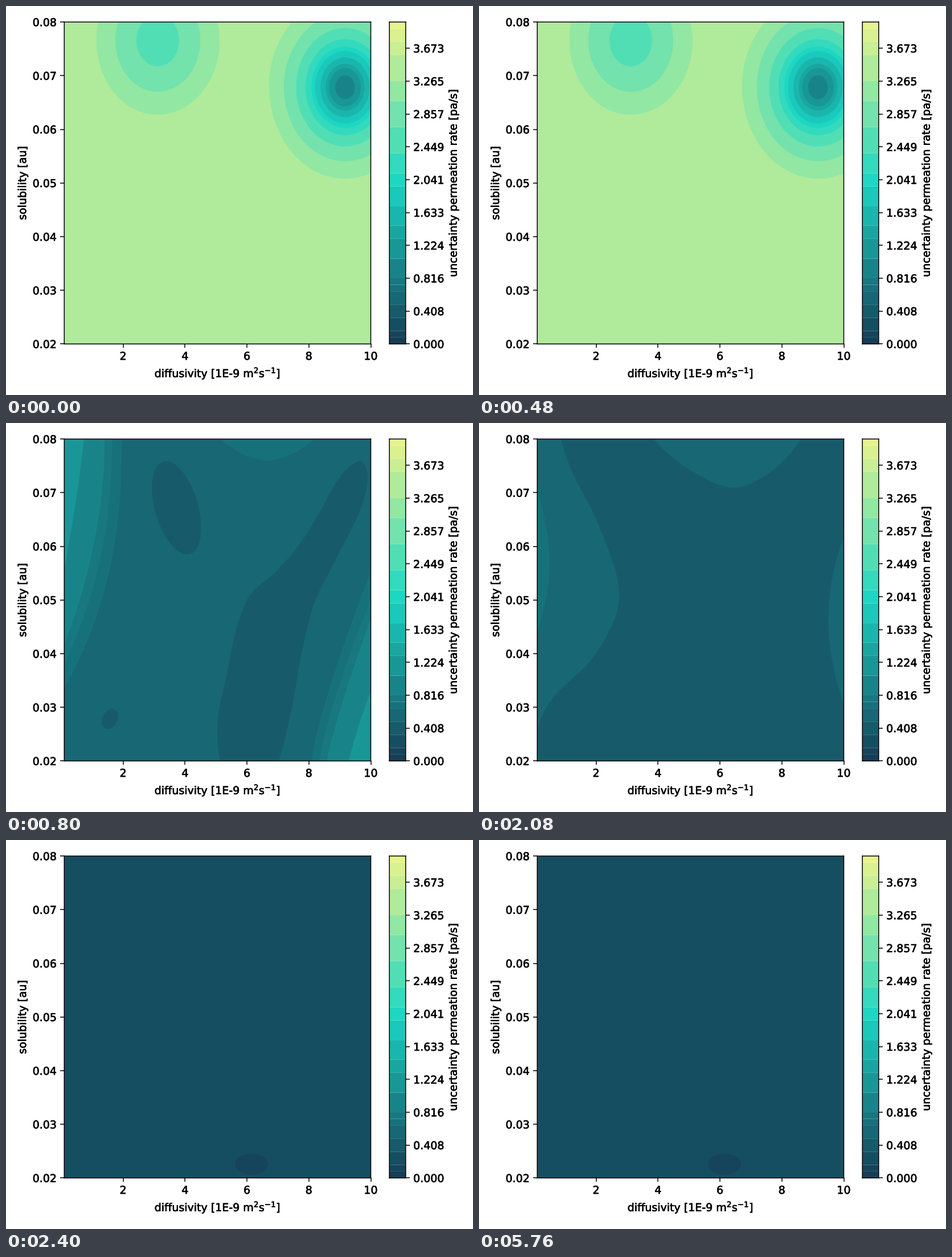
A matplotlib script that plays this animation: 820 by 683 pixels, repeating every 8 s.

```python
import numpy as np
import matplotlib.pyplot as plt
from matplotlib import patheffects
from matplotlib.animation import FuncAnimation
from matplotlib.colors import LinearSegmentedColormap
from matplotlib.patches import Polygon, Rectangle

W, H = 820, 683
LEFT, RIGHT, TOP, BOTTOM = 102.3, 640.5, 28.2, 593.4
BAR_LEFT, BAR_RIGHT = 673.2, 701.8
TOP_LEFT, TOP_RIGHT = (LEFT, TOP), (RIGHT, TOP)

# The scale 0..4 has 49 steps; neighbours of similar colour share one band
STEPS, PEAK = 49, 4
CUTS = [0, 1, 2, 4, 6, 8, 9, 10, 13, 16, 18, 21, 24, 26, 29, 33, 37, 40, 44, 46, 48, 49]
SCALE = LinearSegmentedColormap.from_list("sea", ["#163c54", "#1ad6c4", "#eaf38b"])
COLOURS = {lo: SCALE((lo + hi) / 2 / STEPS) for lo, hi in zip(CUTS, CUTS[1:])}

plt.rcParams.update({"font.family": "DejaVu Sans", "path.snap": False,
                     "text.hinting": "none"})
fig = plt.figure(figsize=(6, 4.998), dpi=136.667, facecolor="white")
stage = fig.add_axes([0, 0, 1, 1])
stage.set(xlim=(0, W), ylim=(H, 0))
stage.axis("off")
plot_area = Rectangle(TOP_LEFT, RIGHT - LEFT, BOTTOM - TOP, transform=stage.transData)
scenes = [[], [], [], []]


def smooth(points, samples=20):
    """Hermite curve through the points, parametrised by root chord length."""
    p = np.array(points, float)
    s = np.r_[0, np.cumsum(np.hypot(*np.diff(p, axis=0).T) ** 0.5)]
    m = np.gradient(p, s, axis=0, edge_order=2)
    t = np.linspace(0, 1, samples)[:, None, None]
    h = np.diff(s)[:, None]
    curve = ((2 * t**3 - 3 * t**2 + 1) * p[:-1] + (3 * t**2 - 2 * t**3) * p[1:]
             + h * ((t**3 - 2 * t**2 + t) * m[:-1] + (t**3 - t**2) * m[1:]))
    return curve.transpose(1, 0, 2).reshape(-1, 2)


def fill(scene, level, outline):
    patch = Polygon(outline, closed=True, fc=COLOURS[level], ec="none")
    stage.add_patch(patch)
    patch.set_clip_path(plot_area)
    scenes[scene].append(patch)


def base(scene, level):
    fill(scene, level, [TOP_LEFT, TOP_RIGHT, (RIGHT, BOTTOM), (LEFT, BOTTOM)])


def region(scene, level, points, *corners):
    fill(scene, level, np.vstack([smooth(points), *corners]))


def oval(scene, level, cx, cy, rx, ry, shear=0):
    a = np.linspace(0, 2 * np.pi, 160)
    x = cx + rx * np.cos(a) + shear * np.sin(a)
    fill(scene, level, np.c_[x, cy + ry * np.sin(a)])


def wedge(scene, level, corner, width, height, power):
    """Corner region whose width shrinks to nothing along its height."""
    t = np.linspace(0, 1, 80)
    x = corner[0] + width * (1 - t**power)
    fill(scene, level, np.vstack([np.c_[x, corner[1] + height * t], corner]))


def dip(x, y, cx, cy):
    return np.exp(-((x - cx) / 93.5) ** 2 - ((y - cy) / 113.2) ** 2)


# Scene 0: deviation of a Gaussian process lowered around two samples
base(0, 40)
x, y = np.meshgrid(np.linspace(LEFT, RIGHT, 270), np.linspace(TOP, BOTTOM, 283))
deviation = np.sqrt(12.2 - 11.46 * dip(x, y, 595.3, 142.7)
                    - 5.8 * dip(x, y, 266.5, 60.5))
for lo, hi in reversed(list(zip(CUTS, CUTS[1:]))):
    cut = hi * PEAK / STEPS
    if lo < 40 and cut > deviation.min():
        scenes[0].append(stage.contourf(x, y, deviation, [0, cut], zorder=1,
                                        colors=[COLOURS[lo]], antialiased=True))

# Scene 1: diagonal valley, two hollows and rising corners
base(1, 6)
region(1, 4, [(376, 594), (371.5, 525), (388, 440), (405, 360), (428, 303),
              (475, 260), (516, 212), (549, 160), (580, 104), (604, 76),
              (624, 67), (635, 90), (624, 147), (584, 230), (542, 315),
              (520, 400), (500, 510), (479, 594)])
oval(1, 4, 299.5, 149, 39, 82, 18.5)
oval(1, 4, 182.5, 519.7, 14, 17.7, -4)
region(1, 8, [(375, 27), (413, 53), (457, 66), (503, 54), (542, 27)])
for level, width, height, power in [(8, 101, 438, 2.4), (9, 84, 396, 2.2),
                                    (10, 71, 362, 1.95), (13, 34, 230, 1.22)]:
    wedge(1, level, TOP_LEFT, width, height, power)
for level, width, height, power in [(8, 104, 332, 1.25), (9, 90, 285, 1.25),
                                    (10, 77, 250, 1.18), (13, 38, 123, 1.18)]:
    wedge(1, level, (RIGHT, BOTTOM), -width, -height, power)

# Scene 2: shallow rises at the sides
base(2, 4)
region(2, 6, [(144, 27), (163, 85), (207, 172), (246, 308), (205, 405),
              (125, 489), (102, 542)], TOP_LEFT)
region(2, 8, [(102, 118), (123.5, 250), (102, 365)])
region(2, 6, [(305, 27), (370, 82), (447, 113.5), (512, 86), (565, 27)])
region(2, 6, [(641, 200), (613.5, 342), (641, 495)])

# Scene 3: almost flat
base(3, 2)
oval(3, 1, 431, 569.3, 29, 18.5)

for lo, hi in zip(CUTS, CUTS[1:]):
    step = (BOTTOM - TOP) / STEPS
    stage.add_patch(Rectangle((BAR_LEFT, BOTTOM - hi * step), BAR_RIGHT - BAR_LEFT,
                              (hi - lo) * step, fc=COLOURS[lo], ec="none"))


def frame_axes(x0, x1):
    ax = fig.add_axes([x0 / W, 1 - BOTTOM / H, (x1 - x0) / W, (BOTTOM - TOP) / H])
    ax.patch.set_visible(False)
    return ax


def outline_text(ax):
    """Draw the labels as slightly heavier vector outlines."""
    effect = [patheffects.withStroke(linewidth=0.35, foreground="black")]
    for text in [ax.xaxis.label, ax.yaxis.label,
                 *ax.get_xticklabels(), *ax.get_yticklabels()]:
        text.set_path_effects(effect)


ax = frame_axes(LEFT, RIGHT)
ax.set(xlim=(0.1, 10), ylim=(0.02, 0.08), xticks=range(2, 11, 2),
       yticks=np.arange(2, 9) / 100, ylabel="solubility [au]",
       xlabel="diffusivity [1E-9 m$^2$s$^{-1}$]")
ax.yaxis.set_major_formatter("{x:.2f}")
outline_text(ax)

bar = frame_axes(BAR_LEFT, BAR_RIGHT)
bar.yaxis.tick_right()
bar.yaxis.set_label_position("right")
bar.set(ylim=(0, PEAK), xticks=[], yticks=np.linspace(0, PEAK, STEPS + 1)[::5],
        ylabel="uncertainty permeation rate [pa/s]")
bar.yaxis.set_major_formatter("{x:.3f}")
outline_text(bar)


def update(i):
    current = min(i, len(scenes) - 1)
    for n, artists in enumerate(scenes):
        for artist in artists:
            artist.set_visible(n == current)
    return []


anim = FuncAnimation(fig, update, frames=10, interval=800, repeat=True,
                     repeat_delay=0, blit=False)
plt.show()
```
